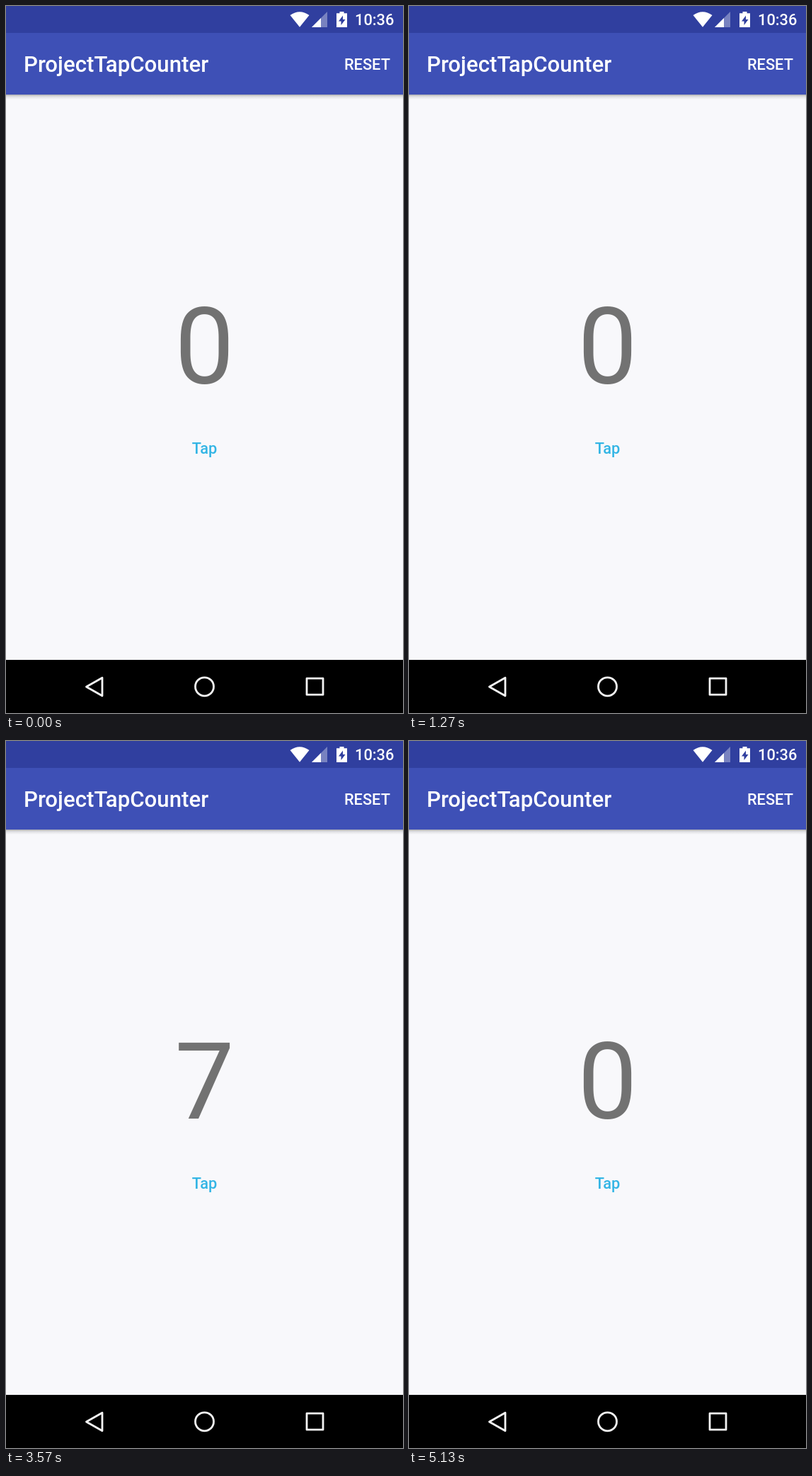
Recreate the animation shown at these times as an HTML page. Size 561 by 998 pixels, loop 5.16 s.

```html
<!DOCTYPE html>
<html lang="en">
<head>
<meta charset="utf-8">
<title>Tap counter</title>
<style>
  html, body { margin: 0; width: 100%; height: 100%; overflow: hidden; background: #f8f8fb; }
  svg { display: block; width: 561px; height: 998px; }
  text { font-family: Roboto, sans-serif; font-weight: 500; font-size: 21.8px; }
</style>
</head>
<body>
<svg viewBox="0 0 561 998" xmlns="http://www.w3.org/2000/svg">
  <defs>
    <linearGradient id="shade" x2="0" y2="1">
      <stop offset="0" stop-opacity=".3"/>
      <stop offset=".4" stop-opacity=".1"/>
      <stop offset="1" stop-opacity="0"/>
    </linearGradient>
    <clipPath id="button"><rect x="218.5" y="596" width="124" height="55.5" rx="3"/></clipPath>
  </defs>

  <rect width="561" height="998" fill="#f8f8fb"/>
  <rect y="125" width="561" height="7" fill="url(#shade)"/>
  <rect y="37" width="561" height="88" fill="#3e50b6"/>
  <rect width="561" height="38" fill="#303f9f"/>

  <g fill="#fff">
    <path d="M415 29.8 401.5 13Q415 3.5 428.5 13Z"/>
    <path d="M454 8V30H432Z" opacity=".35"/>
    <path d="M445 17V30H432Z"/>
    <path d="M471.5 8h6v2.3h4.5v19.7h-15v-19.7h4.5Z"/>
    <path d="M476 13.5 470 21.5h3.5v5.5l6-8h-3.5Z" fill="#303f9f"/>
    <text x="493" y="27.3">10:36</text>
    <text x="25" y="93" font-size="31.2" style="font-size:31.2px">ProjectTapCounter</text>
  </g>
  <g id="resetInk" fill="#fff"></g>
  <text x="478" y="89.5" fill="#fff">RESET</text>

  <text id="count" x="280.5" y="533" text-anchor="middle" fill="#727272" style="font-size:149.6px;font-weight:400">0</text>

  <g clip-path="url(#button)">
    <rect id="glow" x="218" y="595" width="126" height="58"/>
    <g id="tapInk"></g>
  </g>
  <text x="280.5" y="632" text-anchor="middle" fill="#33b5e5">Tap</text>

  <rect y="923" width="561" height="75"/>
  <g fill="none" stroke="#f4f4f4" stroke-width="2.8" stroke-linejoin="round">
    <path d="M113.5 961 136 948.2V973.8Z"/>
    <circle cx="280.5" cy="960.8" r="13"/>
    <rect x="425" y="949.2" width="23" height="23"/>
  </g>
</svg>
<script>
const LOOP = 5160, FIRST_TAP = 1590, TAP_GAP = 190, TAPS = 7, RESET = 3570;
const byId = id => document.getElementById(id);
const clamp = v => Math.max(0, Math.min(1, v));
const mix = (a, b, k) => a + (b - a) * k;
const count = byId('count'), glow = byId('glow');

function addInk(group) {
  const dot = document.createElementNS('http://www.w3.org/2000/svg', 'circle');
  byId(group).append(dot);
  return dot;
}

// A ripple grows from the touch point toward the middle, then fades.
function ripple(dot, age, from, to, radius, alpha) {
  const grow = clamp(age / 103);
  dot.setAttribute('cx', mix(from[0], to[0], grow));
  dot.setAttribute('cy', mix(from[1], to[1], grow));
  dot.setAttribute('r', radius * grow);
  dot.setAttribute('opacity', age < 0 ? 0 : alpha * clamp(1 - (age - 40) / 220));
}

const glowAt = age => clamp(age / 50) * clamp(1 - age / 470);
const taps = Array.from({ length: TAPS }, (_, i) => ({
  at: FIRST_TAP + i * TAP_GAP,
  dot: addInk('tapInk')
}));
const resetDot = addInk('resetInk'), resetGlow = addInk('resetInk');

function draw(t) {
  let total = 0, shine = 0;
  for (const { at, dot } of taps) {
    const age = t - at;
    if (age >= 10) total++;
    shine += glowAt(age);
    ripple(dot, age, [270, 620], [280.5, 623.5], 72, .05);
  }
  glow.setAttribute('opacity', .02 * shine);

  const age = t - RESET;
  ripple(resetDot, age, [508, 80], [510, 81.5], 31, .14);
  ripple(resetGlow, 1000, [510, 81.5], [510, 81.5], 31, 0);
  resetGlow.setAttribute('opacity', .08 * glowAt(age));

  const label = String(age >= 30 ? 0 : total);
  if (count.textContent !== label) count.textContent = label;
}

const start = performance.now();
function tick() {
  draw((performance.now() - start) % LOOP);
  requestAnimationFrame(tick);
}
tick();
</script>
</body>
</html>
```
